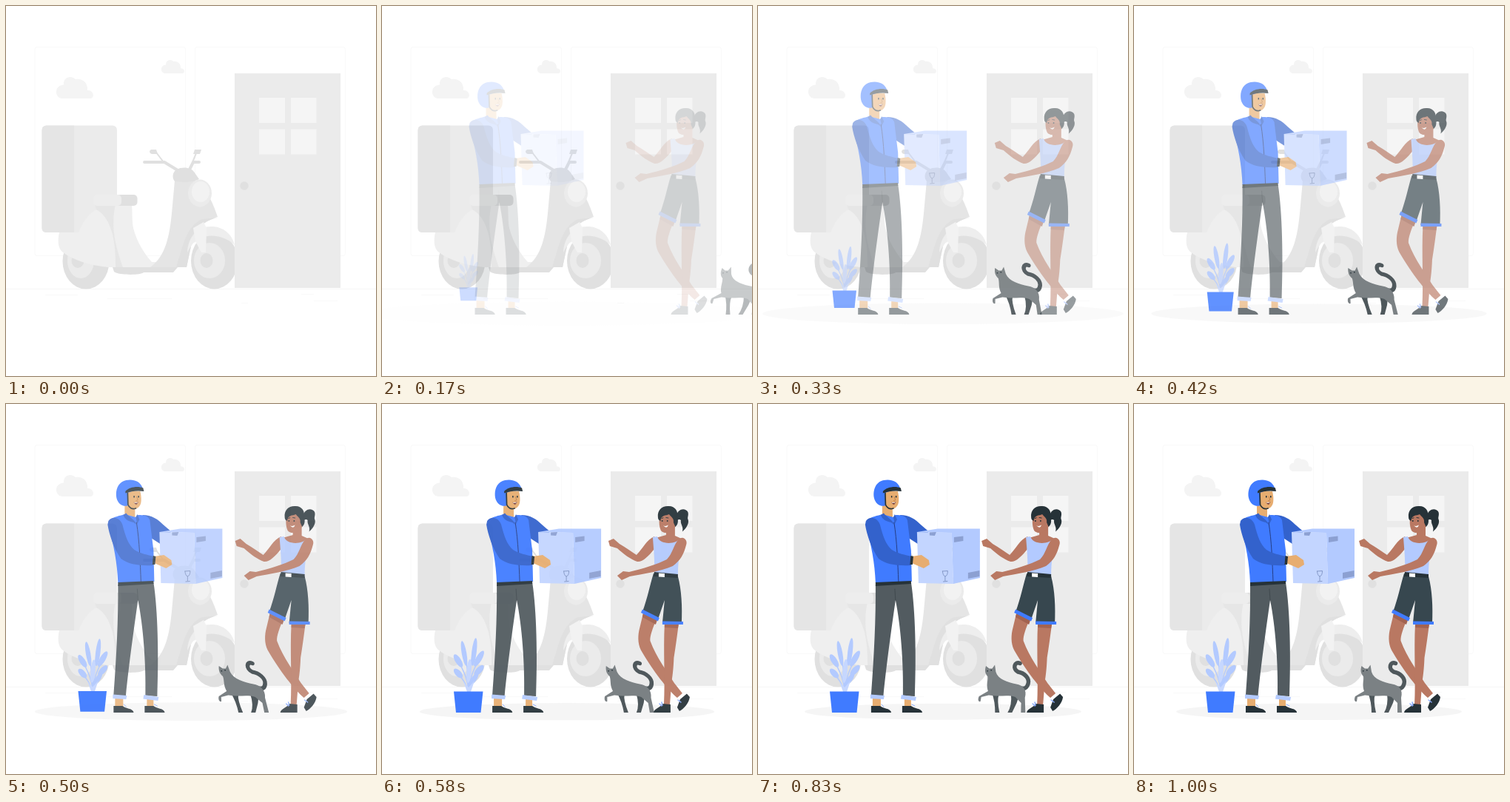
An HTML page for the animation above (1040 ms loop, 500x500 px).

```html
<!DOCTYPE html>
<html lang="en">
<head>
<meta charset="utf-8">
<title>Delivery at the door</title>
<style>
html, body { margin: 0; width: 100%; height: 100%; overflow: hidden; background: #fff; }
svg { display: block; width: 100vw; height: 100vh; }
.line { fill: none; stroke-linecap: round; stroke-linejoin: round; }
</style>
</head>
<body>
<svg viewBox="0 0 500 500">
  <!-- Wall, ground and clouds -->
  <g fill="none" stroke="#f9f9f9">
    <rect x="39" y="55.500" width="203.500" height="282" rx="3"/>
    <rect x="255.500" y="55.500" width="203" height="282" rx="3"/>
    <path stroke="#f6f6f6" d="M0 382.500H500"/>
    <path d="M53 390.500H97M137 395.500H224M318 401.500H327M399 389.500H416M416 398.500H448"/>
  </g>
  <path id="cloud" fill="#f4f4f4" d="M76 125C65 124 65 107 78 106.500C77 96 88 93 94 99C103 97 111 104 110 114C117 113 121 122 115 125Z"/>
  <use href="#cloud" transform="translate(167.8 13.500) scale(.62)"/>

  <!-- Scooter -->
  <g>
    <ellipse cx="108" cy="345" rx="31.500" ry="37.500" fill="#e0e0e0"/>
    <ellipse cx="101" cy="344" rx="18" ry="24" fill="#ebebeb"/>
    <ellipse cx="97" cy="344" rx="8.500" ry="10" fill="#e0e0e0"/>
    <ellipse cx="281.500" cy="344.500" rx="31.500" ry="38" fill="#e0e0e0"/>
    <ellipse cx="275" cy="344" rx="21" ry="24" fill="#ebebeb"/>
    <ellipse cx="271" cy="344" rx="8.500" ry="10" fill="#e0e0e0"/>
    <rect x="48.500" y="161.500" width="101.500" height="144.500" rx="6" fill="#ebebeb"/>
    <path fill="#e5e5e5" d="M55 161.500H92V306H55Q48.500 306 48.500 300V168Q48.500 161.500 55 161.500Z"/>
    <path fill="#e0e0e0" d="M144 353H232L226 360H186C182 364 152 364 146 359Z"/>
    <path fill="#e6e6e6" d="M120 268H152C144 290 146 320 160 353H146Z"/>
    <path fill="#efefef" d="M148 268H170C171 280 170 290 172 300C177 320 188 336 197 346H222V353H158C146 320 142 295 148 268Z"/>
    <path fill="#efefef" d="M72 306H98C104 292 111 281 122 275C139 284 149 310 148 353H138C112 350 92 344 77 333C69 327 70 315 72 306Z"/>
    <rect x="130" y="255" width="47.500" height="15" rx="5" fill="#e0e0e0"/>
    <rect x="118" y="255" width="38" height="15" rx="5" fill="#ededed"/>
    <path fill="#e5e5e5" d="M228 236H262C273 252 281 270 286 285C268 290 255 301 251 320L244 353H195C216 338 221 310 224 280Z"/>
    <path fill="#e0e0e0" d="M286 286C268 290 255 301 251 320L244 353H230C239 325 243 298 265 288Z"/>
    <ellipse cx="262" cy="253" rx="16" ry="18.500" fill="#ebebeb"/>
    <ellipse cx="263" cy="251" rx="12" ry="14" fill="#f2f2f2"/>
    <path fill="#e0e0e0" d="M230 221C240 216 251 219 254 224L261 234C251 239 237 238 228 237C224 232 225 225 230 221Z"/>
    <path fill="#eee" d="M245 333C246 310 261 297 279 298C297 299 306 311 309 323C295 310 277 308 264 313Q252 318 245 333Z"/>
    <path fill="#f2f2f2" d="M253 300L267 292L271 300L270 333H264L256 318Z"/>
    <g class="line" stroke="#e0e0e0" stroke-width="2">
      <path d="M203 198L213 211M257 199L252 211"/>
      <path stroke-width="4" d="M187 211H214L232 222M261 211H253L248 221"/>
    </g>
    <path fill="#e0e0e0" d="M196 194H203L205 200H198Q194 200 194 196ZM255 194H264L262 200H253Z"/>
  </g>

  <!-- Door -->
  <path fill="#ebebeb" d="M309 91H452V381H309Z"/>
  <path fill="#f5f5f5" d="M342 124h35v34h-35zM385 124h34.500v34h-34.500zM342 166.500h35v34h-35zM385 166.500h34.500v34h-34.500z"/>
  <circle cx="322" cy="243" r="5.700" fill="#e0e0e0"/>

  <ellipse id="shadow" cx="250" cy="415.700" rx="193" ry="11.300" fill="#f5f5f5"/>

  <g id="plant">
    <path class="line" stroke="#b3caff" stroke-width="1.500" d="M117 389C117 365 121 345 125 325M117 389C118 365 113 345 110 326M117 388C118 370 125 357 131 345M117 388C116 370 109 359 103 347M117 388C119 376 126 369 133 360M117 388C114 378 108 370 101 362"/>
    <g fill="#b3caff">
      <ellipse cx="124.500" cy="335" rx="3.300" ry="19" transform="rotate(7 124.500 335)"/>
      <ellipse cx="111" cy="337" rx="3.300" ry="17" transform="rotate(-10 111 337)"/>
      <ellipse cx="131" cy="344" rx="4" ry="12" transform="rotate(30 131 344)"/>
      <ellipse cx="103" cy="347" rx="4" ry="10" transform="rotate(-32 103 347)"/>
      <ellipse cx="131" cy="360" rx="4" ry="9" transform="rotate(42 131 360)"/>
      <ellipse cx="103" cy="364" rx="4" ry="8" transform="rotate(-42 103 364)"/>
      <ellipse cx="124" cy="372" rx="3.500" ry="10" transform="rotate(35 124 372)"/>
      <ellipse cx="117.500" cy="361" rx="3.300" ry="16" transform="rotate(5 117.500 361)" fill="#c6d7ff"/>
    </g>
    <path fill="#c6d7ff" d="M110 375L117 383 125 374 120 389H115Z"/>
    <path fill="#407bff" d="M97 388.500H136.500L133.500 417H100Z"/>
  </g>

  <g id="cat">
    <path class="line" stroke="#4f585c" stroke-width="5.500" d="M353.500 350.500C346 347 343 358 351 362C360 363.500 367 371 365 378C363.500 384 360 385 355 384"/>
    <path fill="#4f585c" d="M316 390L326 392Q323 400 327 417H321Q321 402 316 390ZM342 391L353 394 350 404 344 417H338Q344 407 342 391Z"/>
    <path fill="#7b8184" d="M307.500 354L312 357.500H316L319.500 352.500L321 362C324 372 337 376 349 378.500C358 380 364 386 361 397L362 417H356L356 404L348 396C339 393 330 395 322 394.500L312 393.500 302 396 301 402C298 403 297 399 299 395L311 388C308 380 311 374 310 368C306 364 306 359 307.500 354Z"/>
    <path fill="#263238" d="M309 360h1.500v1.500h-1.500zM314 359h1.500v1.500h-1.500z"/>
  </g>

  <g id="woman">
    <path fill="#263238" d="M396 151C398 141 408 140 411.500 146C413 151 410 153 412 157C413 163 408 169 404 172.500C406 165 401 163 402 157C400 155 398 156 396 158Z"/>
    <g fill="#b97862">
      <path d="M366 179L370 187 366 196C358 206 350 214 343 213C334 210 325 203 316 195L306 192 304 185 311 182 319 189C328 194 336 200 342 204C350 196 356 183 366 179Z"/>
      <path d="M351 283L369 291C364 303 360 313 360.500 320C369 343 384 362 393 377L404 391 397 397C384 386 364 360 350 336C344 327 343.500 316 345.500 306Z"/>
      <path d="M380 297H399C397 312 395 328 392.500 343C392 356 391 366 389.500 375L387 407H379C381 370 378 335 380 297Z"/>
      <path d="M382 169L394 163 394 178 403 182 396 190H374L368 181 382 177Z"/>
      <path d="M373.500 151C378 146 390 147 394 154L395 165C390 174 380 177 375 171C372 165 372.500 156 373.500 151Z"/>
    </g>
    <path fill="#a36350" d="M351 283L370 292 368 298 350 288ZM380 297H399L398 303 380 302Z"/>
    <path fill="#263238" d="M371 153C370 143 377 137 386 138C394 138 399 145 397 153C399 158 398 163 394.500 166L392 160C393 154 388 152 386 149C381 151 375 150 374.500 158Q371 157 371 153Z"/>
    <path fill="#263238" d="M376 157h1.500v2h-1.500zM383 157h1.500v2h-1.500z"/>
    <path class="line" stroke="#263238" d="M376 154.500l2-.7M382 153.500l3 .5"/>
    <path fill="#fff" d="M378 164Q381 166 385 163.500Q383 169.500 378 164Z"/>
    <path fill="#b3caff" d="M364 180L370 179C373 190 394 191 402 181L406 183C400 197 398 214 398 233L366 229C367 213 365 194 364 180Z"/>
    <path fill="#b97862" d="M399 183C405 177 412 184 409 191C406 203 401 212 391 219C375 226 350 230 333 233L322 238 316 232 324 226 332 227C350 223 371 216 383 210C391 202 392 190 399 183Z"/>
    <path fill="#37474f" d="M365 229L398 233C403 251 404 275 403 296H377L380 265 371 291 350 281C357 262 360 245 365 229Z"/>
    <path fill="#263238" d="M366 227L398 230V235L365 233Z"/>
    <path fill="#fff" d="M372 228.500l8 .5v5l-8-.5z"/>
    <path fill="#407bff" d="M350 277.500L373 289 371 293.500 348 282ZM377 293.500L405 294V298H377Z"/>
    <path fill="#263238" d="M365 417C366 411 374 411 377 405L388 406V417ZM397 410L401 399 410 391.500 414 396C413 404 406 412 400 415Z"/>
    <path class="line" stroke="#8bacff" stroke-width="1.500" d="M373 405l3 3M376 403l1 4M398 400l4 3"/>
  </g>

  <g id="man">
    <path fill="#3362cc" d="M190 150C203 150 211 156 218 163L229 172.500 214 189 200 180Z"/>
    <path fill="#e7ad70" d="M153 397H164V410H153ZM196 398H205V410H196Z"/>
    <path fill="#525b60" d="M157 244L205 241C211 280 212 340 210 395L194 394C195 350 191 300 184 265C179 300 172 350 167.500 395L151 393C155 340 157.500 290 157 244Z"/>
    <path class="line" stroke="#40494e" d="M184 265L183 250"/>
    <path fill="#b3caff" d="M150 392.500L169 394 168 399 150 398ZM192 393L212 396 211 401 191 398.500Z"/>
    <path fill="#263238" d="M151 408H163C168 412 176 411 178 416V417H151ZM193 408H205C210 412 218 411 220 416V417H193Z"/>
    <path class="line" stroke="#8bacff" d="M165 406l3 3M206 406l4 2"/>
    <path fill="#e7ad70" d="M166 135L180 141 180 154 166 150Z"/>
    <path fill="#407bff" d="M146 157C151 152 160 151 166 149L181 153 184 150C192 150 198 151 200 157L205 198 206 240 157 242C156 214 151 190 145 169Z"/>
    <path fill="#3362cc" d="M164 150L168 147.500C172 153 180 156 182 163L178 160C172 159 166 156 164 150ZM181 153L183 149 186 156 183 162Z"/>
    <path class="line" stroke="#263e83" d="M182 160C186 185 187 215 188 240"/>
    <path fill="#263238" d="M157 241L205 239V243L157 246Z"/>
    <path fill="#e7ad70" d="M170 118H187C189 126 189 135 186 138C182 144 173 143 169 137Z"/>
    <path fill="#407bff" d="M190 113C187 104 177 101 168 103C157 105 153 117 155 127C157 135 163 139 170 137.500L170 120Z"/>
    <path fill="#263238" d="M167 118C172 112 184 110.500 191 113.500L192 118C183 116.500 174 118 167 120.500Z"/>
    <path class="line" stroke="#263238" stroke-width="1.700" d="M170 120L170.500 136C172 140 176 143 181 141"/>
    <path fill="#263238" d="M178 124h1.500v2.500h-1.500zM184 124h1.500v2.500h-1.500z"/>
    <path class="line" stroke="#b87945" stroke-width=".8" d="M182 125L184 130 181.500 130.500"/>
    <path fill="#6b302d" d="M178 132.500Q181 134 184.500 132Q182 139 178 132.500Z"/>
    <path fill="#fff" d="M178.500 132.700Q181 134 184 132.400L183 134H179.500Z"/>
    <!-- Parcel -->
    <path fill="#c3d5ff" d="M213 173L260 174 262 243 215 242Z"/>
    <path fill="#b3caff" d="M260 174L298 168.500V235L262 243ZM213 173L241 168.500 298 168.500 260 174Z"/>
    <path fill="#8ca0d2" d="M230 173.500L239 173 237 178 230 177.500ZM263 180L275.500 178.500V185L263 187ZM282 228L297.500 225V233L282 236Z"/>
    <path class="line" stroke="#8498c7" d="M247.500 226L254.500 225.500Q254.500 232 251 233Q248 232 247.500 226M251 233V239M248.500 240L254 239.500"/>
    <!-- Near arm -->
    <path fill="#e7ad70" d="M206 206L219 204 229 211 230 217 222 222 206 215Z"/>
    <path fill="#3362cc" d="M144 158C150 150 160 154 163 163C167 179 171 190 179 197C187 202 197 204 206 206L204 218C188 219 171 217 161 209C151 195 145 176 143 163Z"/>
    <path fill="#263238" d="M204.500 205L208 206 207 217 203.500 217Z"/>
  </g>
</svg>
<script>
const PERIOD = 1040, FPS = 24;
const $ = id => document.getElementById(id);
const clamp = v => Math.max(0, Math.min(1, v));
const mix = (a, b, p) => a + (b - a) * p;

// Cubic Bezier easing with a slight overshoot
function ease(x) {
  if (x <= 0 || x >= 1) return clamp(x);
  const curve = (s, a, b) => 3 * s * (1 - s) ** 2 * a + 3 * s * s * (1 - s) * b + s ** 3;
  let lo = 0, hi = 1;
  for (let i = 0; i < 24; i++) {
    const mid = (lo + hi) / 2;
    if (curve(mid, .36, .5) < x) lo = mid; else hi = mid;
  }
  return curve(lo, -.01, 1.38);
}

function place(id, transform, opacity) {
  $(id).setAttribute("transform", transform);
  $(id).setAttribute("opacity", clamp(opacity));
}

const around = (x, y, change) => `translate(${x} ${y}) ${change} translate(${-x} ${-y})`;

// Catch the skew between its rest points at 60 %, 80 % and the end
function catSkew(u) {
  if (u < .6) return mix(-20, 10, ease(u / .6));
  if (u < .8) return mix(10, -2, ease((u - .6) / .2));
  return mix(-2, 0, ease((u - .8) / .2));
}

function draw(now) {
  const step = Math.min(24, Math.floor((now % PERIOD + 4) * FPS / 1000));
  const u = step < 2 ? 0 : Math.min(1, (step + .9) / FPS);
  const p = ease(u), run = ease(u / .6);
  const g = clamp(u / .62), grow = g * g * (3 - 2 * g);

  place("man", `translate(${mix(-30, 0, p)} 0)`, p);
  place("woman", `translate(${mix(30, 0, p)} 0)`, p);
  place("shadow", around(250, 415.7, `scale(${mix(1.5, 1, p)})`), p);
  place("plant", around(116.7, 366.5, `scale(${mix(.5, 1, grow)})`), grow);
  place("cat", around(333, 382, `translate(${mix(250, 0, run)} 0) skewX(${catSkew(u)})`), run);
}

const start = performance.now();
function tick() {
  draw(performance.now() - start);
  requestAnimationFrame(tick);
}
tick();
</script>
</body>
</html>
```
